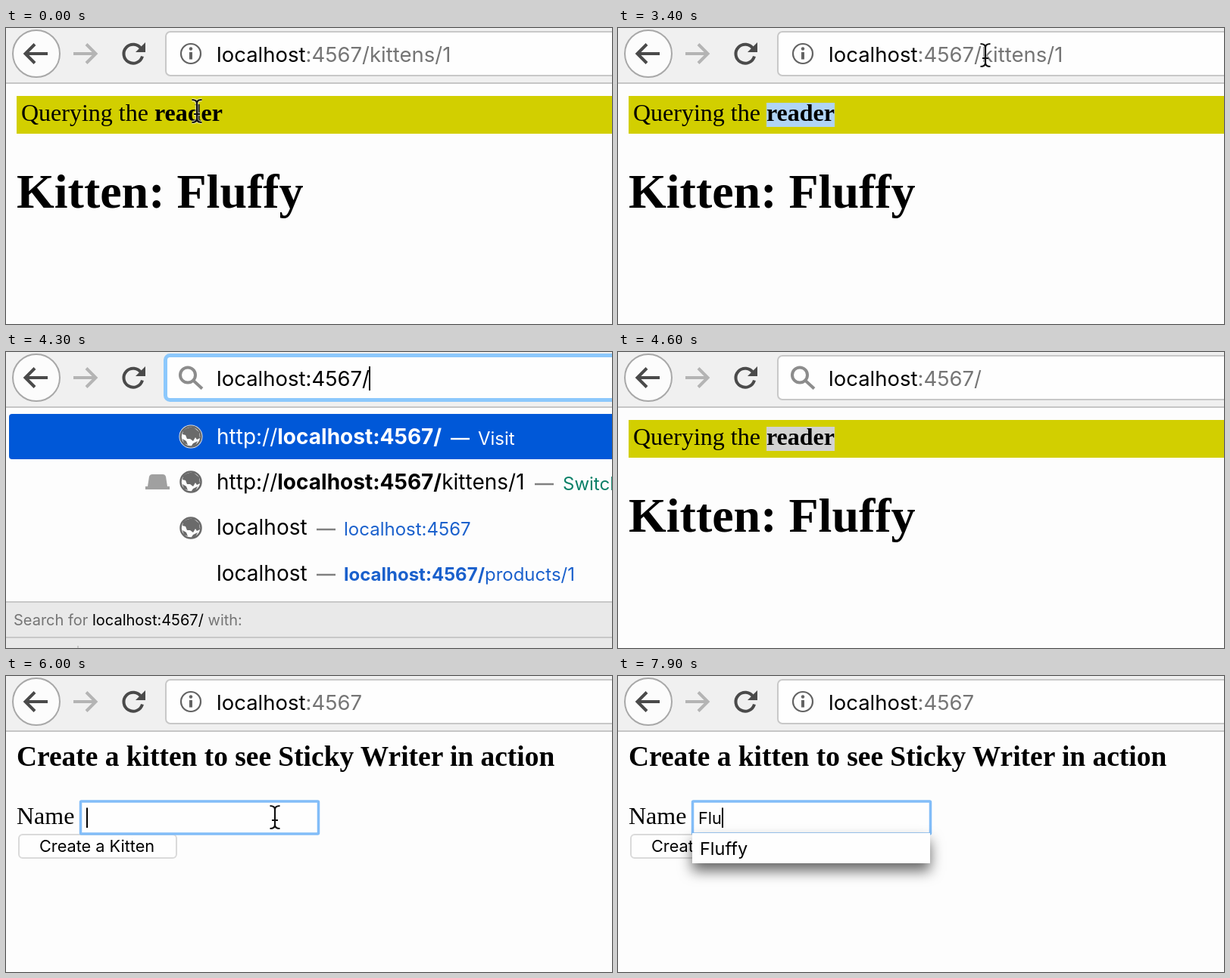
Recreate the animation shown at these times as an HTML page. Size 800 px wide and 392 px high, loop 8000 ms.

```html
<!DOCTYPE html>
<html lang="en">
<head>
<meta charset="utf-8">
<title>Kitten form</title>
<style>
  html, body { margin: 0; width: 100%; height: 100%; overflow: hidden; background: #fdfdfd; }
  svg { display: block; width: 800px; height: 392px; }
  text { white-space: pre; font: 27.5px Inter, Roboto, sans-serif; font-feature-settings: "calt" 0; }
  #list text { font-size: 28px; }
  .page text { font: 32px "Liberation Serif", Times, serif; }
  .page .ui { font: 21.7px Inter, Roboto, sans-serif; }
  .page .h1 { font-size: 64px; font-weight: bold; }
  .page .h3 { font-size: 37.44px; font-weight: bold; }
  .b { font-weight: 700; }
  .side { font-size: 24px; }
  #list .small { font-size: 20px; }
  .line { fill: none; stroke-width: 4; }
  #popup rect { filter: drop-shadow(0 10px 9px #0009); }
</style>
</head>
<body>
<svg viewBox="0 0 800 392">
  <defs>
    <g id="globe">
      <circle r="15.5" fill="#fdfdfd"/>
      <circle r="13.5" fill="#fdfdfd" stroke="#6a6a6a" stroke-width="2.5"/>
      <path fill="#6a6a6a" d="M-10-8Q-4-13 4-12L11-6 12 2 8 4 6 1 3 6-1 3-5 3-7-2-11-3ZM3 9 9 6 6 12 1 12ZM-11 3-6 6-4 11-9 9Z"/>
    </g>
    <path id="beam" d="M-6.5-15Q0-15 0-10V10Q0 15-6.5 15M6.5-15Q0-15 0-10V10Q0 15 6.5 15M-4 4H4"/>
  </defs>

  <g id="kitten" class="page">
    <path fill="#d2cf00" d="M14 90H800V140H14Z"/>
    <rect id="wordSel" x="196" y="99" width="90" height="32"/>
    <text x="20" y="123">Querying the <tspan class="b">reader</tspan></text>
    <text class="h1" x="14" y="238">Kitten: Fluffy</text>
  </g>

  <g id="form" class="page">
    <text class="h3" x="14" y="119">Create a kitten to see Sticky Writer in action</text>
    <text x="14" y="196">Name</text>
    <rect x="17" y="210" width="208" height="31" rx="5" fill="#fefefe" stroke="#dadada" stroke-width="2"/>
    <text class="ui" x="44" y="233">Create a Kitten</text>
    <rect id="field" x="98.5" y="166" width="314" height="43" rx="1" fill="#fefefe"/>
    <text id="typed" class="ui" x="106" y="196"></text>
    <g id="popup">
      <rect x="98" y="208" width="314" height="40" fill="#fefefe"/>
      <text class="ui" x="108" y="237" style="font-size:23.5px">Fluffy</text>
    </g>
    <path id="fieldCaret" stroke="#000" stroke-width="2"/>
  </g>

  <path fill="#f0f0f0" d="M0 0H800V72H0Z"/>
  <path fill="#c6c6c6" d="M0 72H800V74H0Z"/>
  <circle cx="40" cy="34" r="31" fill="#fcfcfc" stroke="#a8a8a8" stroke-width="2"/>
  <path class="line" stroke="#4a4a4a" d="M25 34H55M38 21.5 25.5 34 38 46.5"/>
  <path class="line" stroke="#b4b4b4" d="M89 34H119M106 21.5 118.5 34 106 46.5"/>
  <path class="line" stroke="#4a4a4a" d="M178.5 27.5A12.5 12.5 0 1 0 180 37.5"/>
  <path fill="#4a4a4a" d="M184 19V32H171Z"/>

  <rect id="bar" width="620" rx="6" fill="#fefefe"/>
  <g id="info" fill="#636363">
    <circle cx="244" cy="34" r="13" fill="none" stroke="#636363" stroke-width="2.2"/>
    <circle cx="244" cy="27.5" r="2.2"/>
    <path d="M242 32H246V41.5H242Z"/>
  </g>
  <g id="search" class="line" stroke="#8c8c8c">
    <circle cx="240" cy="30.5" r="10"/>
    <path d="M247 37.5 259 48.5"/>
  </g>
  <rect id="urlSel" x="480" y="18" height="33" fill="#b4d5fe"/>
  <text x="278" y="45">localhost<tspan id="path"></tspan></text>
  <path id="urlCaret" stroke="#000" stroke-width="2" d="M480 19V51"/>

  <g id="list">
    <path fill="#fdfdfd" d="M0 74H800V331H0Z"/>
    <rect x="4" y="82" width="810" height="60" rx="4" fill="#0058d8"/>
    <text x="278" y="122" fill="#fff">http://<tspan class="b">localhost:4567/</tspan><tspan class="side" x="623" y="123">Visit</tspan></text>
    <text x="278" y="182">http://<tspan class="b">localhost:4567/</tspan>kittens/1<tspan class="side" x="735" y="183" fill="#0a8068">Switch to Tab</tspan></text>
    <text x="278" y="242">localhost<tspan class="side" x="446" y="243" fill="#1a60cc">localhost:4567</tspan></text>
    <text x="278" y="303">localhost<tspan class="side" x="446" fill="#1a60cc"><tspan class="b">localhost:4567/</tspan>products/1</tspan></text>
    <path stroke="#fff" stroke-width="2.4" d="M587 115H612"/>
    <path stroke="#808080" stroke-width="2.4" d="M698 175H723M410 235H435M410 295H435"/>
    <use href="#globe" x="244" y="112"/>
    <use href="#globe" x="244" y="172"/>
    <use href="#globe" x="244" y="233"/>
    <path fill="#a0a0a0" d="M184 182V178H187L189 165Q190 162 193 162H207Q210 162 211 165L213 178H216V182Z"/>
    <path fill="#e9e9e9" d="M0 331H800V392H0Z"/>
    <path stroke="#c8c8c8" stroke-width="2" d="M0 331H800M0 378H800M95 389V392"/>
    <text class="small" x="10" y="362" fill="#757575">Search for <tspan fill="#000">localhost:4567/</tspan> with:</text>
  </g>

  <g id="cursor" fill="none">
    <use href="#beam" stroke="#fefefe" stroke-opacity=".6" stroke-width="4.5"/>
    <use href="#beam" stroke="#111" stroke-width="2.2"/>
  </g>
</svg>
<script>
const $ = id => document.getElementById(id);
const show = (id, on) => $(id).style.display = on ? "" : "none";
const set = (id, attrs) => { for (const k in attrs) $(id).setAttribute(k, attrs[k]); };

const T = { select: 1500, focus: 3500, erase: 4100, enter: 4500, load: 4800, click: 5800, type: 7300, popup: 7500 };

// Pointer stops: time, x, y
const stops = [[0, 252, 110], [2200, 252, 110], [2900, 485, 36], [3500, 485, 36], [3900, 592, 36],
               [4900, 592, 36], [5700, 355, 187], [8000, 355, 187]];

function pointer(t) {
  const i = stops.findIndex(s => s[0] > t);
  const [t0, x0, y0] = stops[i - 1], [t1, x1, y1] = stops[i];
  const u = (t - t0) / (t1 - t0), e = u * u * (3 - 2 * u);
  return [x0 + (x1 - x0) * e, y0 + (y1 - y0) * e];
}

function draw(t) {
  const loaded = t >= T.load, erased = t >= T.erase;
  const focus = t >= T.focus && t < T.enter;
  const inField = t >= T.click;
  const [x, y] = pointer(t);

  show("kitten", !loaded);
  show("form", loaded);
  show("wordSel", t >= T.select);
  set("wordSel", { fill: t < T.focus ? "#b0d4f6" : "#d2d2d2" });

  set("bar", focus ? { x: 210.5, y: 4.5, height: 59, stroke: "#8cc8fc", "stroke-width": 5 }
                   : { x: 211, y: 5, height: 58, stroke: "#c8c8c8", "stroke-width": 2 });
  const searching = erased && !loaded;
  show("info", !searching);
  show("search", searching);
  show("urlSel", focus && !erased);
  set("urlSel", { width: Math.max(0, Math.min(x, 588) - 480) });
  show("urlCaret", focus && erased);
  show("list", focus && erased);
  $("path").textContent = loaded ? ":4567" : erased ? ":4567/" : ":4567/kittens/1";
  set("path", { fill: focus ? "#000" : "#757575" });

  set("field", inField ? { stroke: "#82bdf8", "stroke-width": 3.5 } : { stroke: "#c8c8c8", "stroke-width": 2 });
  const count = t < T.type ? 0 : Math.min(3, 1 + Math.floor((t - T.type) / 200));
  $("typed").textContent = "Flu".slice(0, count);
  show("popup", t >= T.popup);
  show("fieldCaret", inField && (count || (t - T.click) % 1000 < 500));
  set("fieldCaret", { d: `M${[107, 120, 125, 138][count]} 174.5V201` });

  show("cursor", t < T.erase || t >= T.load + 100 && t < T.type);
  set("cursor", { transform: `translate(${x} ${y})` });
}

function tick() {
  const t = performance.now() % 8000;
  draw(Math.floor(t / 100) * 100);
  requestAnimationFrame(tick);
}
tick();
</script>
</body>
</html>
```
